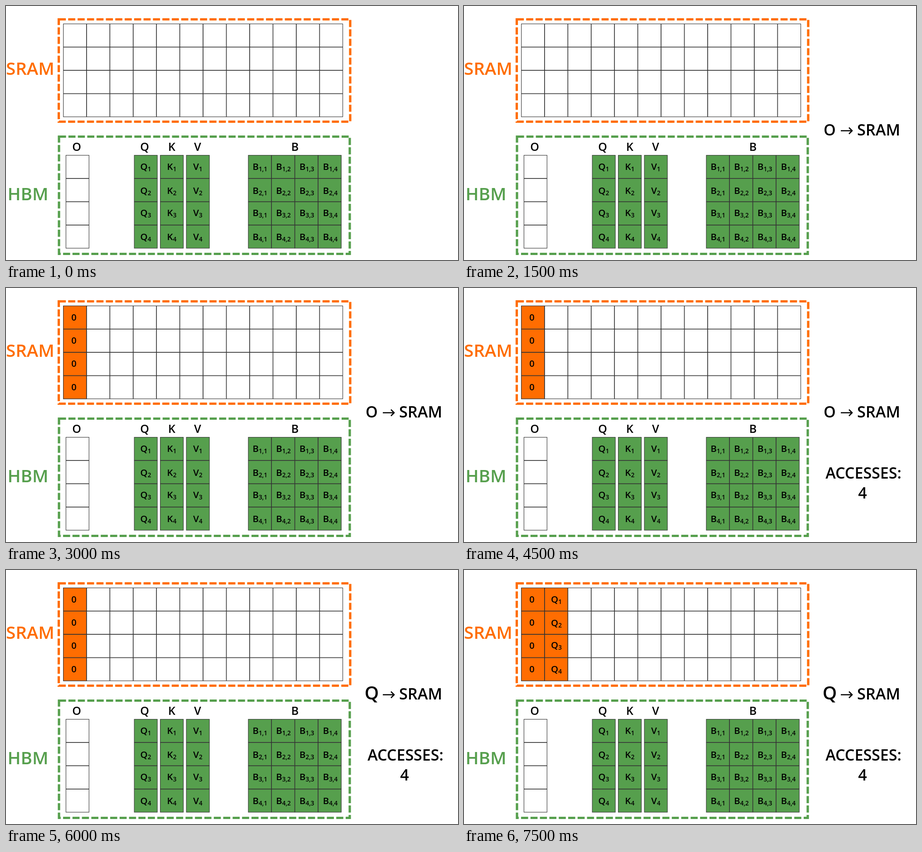
An HTML page for the animation above (8 s loop, 998 by 561 pixels).

```html
<!DOCTYPE html>
<html lang="en">
<head>
<meta charset="utf-8">
<title>Memory accesses</title>
<style>
  html, body { margin: 0; width: 100%; height: 100%; overflow: hidden; background: #fff; }
  svg { display: block; width: 998px; height: 561px; }
  text { font-family: "Open Sans", "Noto Sans", sans-serif; font-weight: 600; }
  .cell { stroke: #333; stroke-width: 1.1; }
</style>
</head>
<body>
<svg id="stage" viewBox="0 0 998 561"></svg>
<script>
const ORANGE = '#ff6d01', GREEN = '#569f4d';
const PITCH = 51.45, CELL = 50.9, STEP_MS = 1500, LOOP_MS = 8000;
const stage = document.getElementById('stage');
const timed = [];

function add(tag, attrs, parent = stage, content = '') {
  const node = document.createElementNS('http://www.w3.org/2000/svg', tag);
  for (const key in attrs) node.setAttribute(key, attrs[key]);
  node.textContent = content;
  return parent.appendChild(node);
}

// A group visible from step `from` up to, but not including, step `to`.
function during(from, to = Infinity) {
  const node = add('g', {});
  timed.push({ node, from, to });
  return node;
}

function label(content, x, y, size, parent = stage, fill = '#000', anchor = 'middle') {
  return add('text', { x, y, fill, 'font-size': size, 'text-anchor': anchor }, parent, content);
}

function indexed(letter, index, x, y, parent = stage) {
  const node = label(letter, x, y, 20.4, parent);
  add('tspan', { 'font-size': 13.5, dy: 3 }, node, index);
}

// Each cell has its own outline, so inner lines come out double.
function cells(x, y, columns, fill, parent = stage) {
  for (let row = 0; row < 4; row++)
    for (let column = 0; column < columns; column++)
      add('rect', { class: 'cell', x: x + column * PITCH, y: y + row * PITCH,
        width: CELL, height: CELL, fill }, parent);
}

function frame(x, y, width, height, stroke) {
  add('rect', { x, y, width, height, stroke, fill: 'none',
    'stroke-width': 5.2, 'stroke-dasharray': '15.6 5.2' });
}

frame(116.5, 29.5, 643.5, 226, ORANGE);
frame(117, 288.5, 642, 259, GREEN);
label('SRAM', 0, 152, 38.5, stage, ORANGE, 'start');
label('HBM', 48.5, 429, 38.5, stage, GREEN);

cells(126.7, 39.5, 12, '#fff');
cells(132.4, 329.7, 1, '#fff');
label('O', 156, 320, 25);

const rowBaselines = [362, 414.5, 463.5, 516.5];
[['Q', 283.2, 306], ['K', 340.7, 366], ['V', 398.2, 423]].forEach(([letter, x, titleX]) => {
  cells(x, 329.7, 1, GREEN);
  label(letter, titleX, 320, 25);
  rowBaselines.forEach((y, row) => indexed(letter, row + 1, x + 25.3, y));
});

cells(535, 329.7, 4, GREEN);
label('B', 638, 320, 25);
rowBaselines.forEach((y, row) => {
  for (let column = 0; column < 4; column++)
    indexed('B', `${row + 1},${column + 1}`, 560.7 + column * 51.8, y);
});

const zeros = during(2);
cells(126.7, 39.5, 1, ORANGE, zeros);
for (let row = 0; row < 4; row++) label('0', 150, 71.5 + row * PITCH, 20, zeros);

const queries = during(5);
cells(126.7 + PITCH, 39.5, 1, ORANGE, queries);
rowBaselines.forEach((y, row) => indexed('Q', row + 1, 204, y - 290.5, queries));

const transfer = during(1);
label('SRAM', 868, 286, 34.3, transfer, '#000', 'start');
add('path', { d: 'M832 275.5H857M850 268.5L857 275.5L850 282.5',
  fill: 'none', stroke: '#000', 'stroke-width': 2.5 }, transfer);
label('O', 807.5, 286, 34, during(1, 4));
label('Q', 807.5, 285.5, 40, during(4));

const counter = during(3);
label('ACCESSES:', 882, 420.5, 34, counter);
label('4', 880, 464.5, 34, counter);

function draw(now) {
  const step = Math.floor((now % LOOP_MS) / STEP_MS);
  for (const { node, from, to } of timed)
    node.style.display = step >= from && step < to ? '' : 'none';
}

const start = performance.now();
function tick() {
  draw(performance.now() - start);
  requestAnimationFrame(tick);
}
tick();
</script>
</body>
</html>
```
